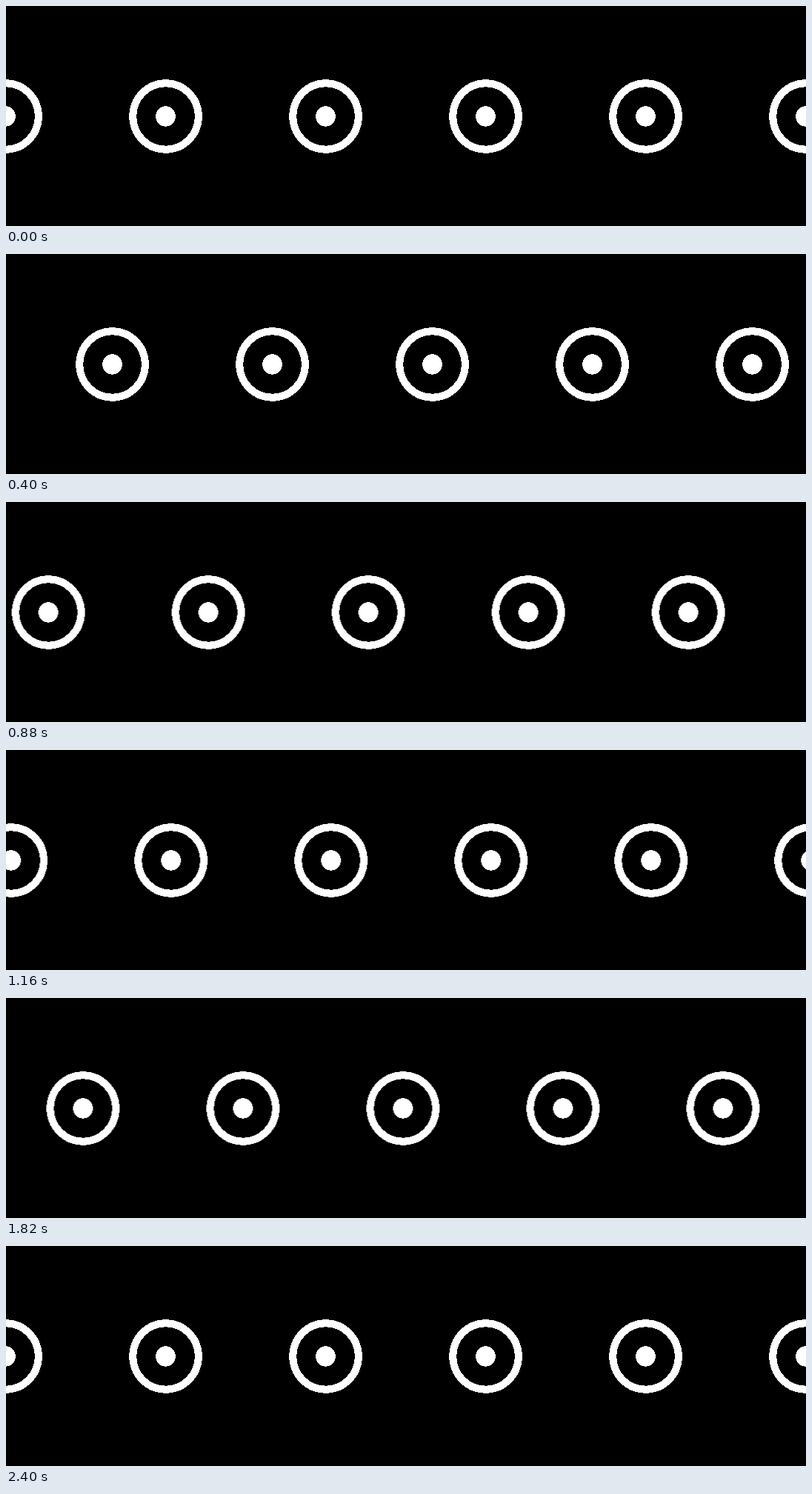
An HTML page for the animation above (2.44 s loop, 1080x297 px).

```html
<!DOCTYPE html>
<html lang="en">
<head>
<meta charset="utf-8">
<title>Sliding rings</title>
<style>
  html, body { margin: 0; width: 100%; height: 100%; overflow: hidden; background: #000; }
  svg { display: block; width: 1080px; height: 297px; shape-rendering: crispEdges; }
  .ring { fill: none; stroke: #fff; stroke-width: 10; }
  .dot { fill: #fff; }
  .row { animation: slide 2440ms infinite; }

  /* 120 steps of 20 ms, then a 40 ms rest */
  @keyframes slide {
    0% { transform: translateX(0); animation-timing-function: steps(120, end); }
    98.360656%, 100% { transform: translateX(-432px); }
  }
</style>
</head>
<body>
<svg viewBox="0 0 1080 297">
  <defs>
    <g id="eye">
      <ellipse class="ring" cx="-0.45" cy="149" rx="44.3" ry="44.7"/>
      <ellipse class="dot" cx="-0.45" cy="149" rx="13.3" ry="13.7"/>
    </g>
  </defs>
  <g class="row">
    <use href="#eye"/>
    <use href="#eye" x="216"/>
    <use href="#eye" x="432"/>
    <use href="#eye" x="648"/>
    <use href="#eye" x="864"/>
    <use href="#eye" x="1080"/>
    <use href="#eye" x="1296"/>
    <use href="#eye" x="1512"/>
  </g>
</svg>
</body>
</html>
```
